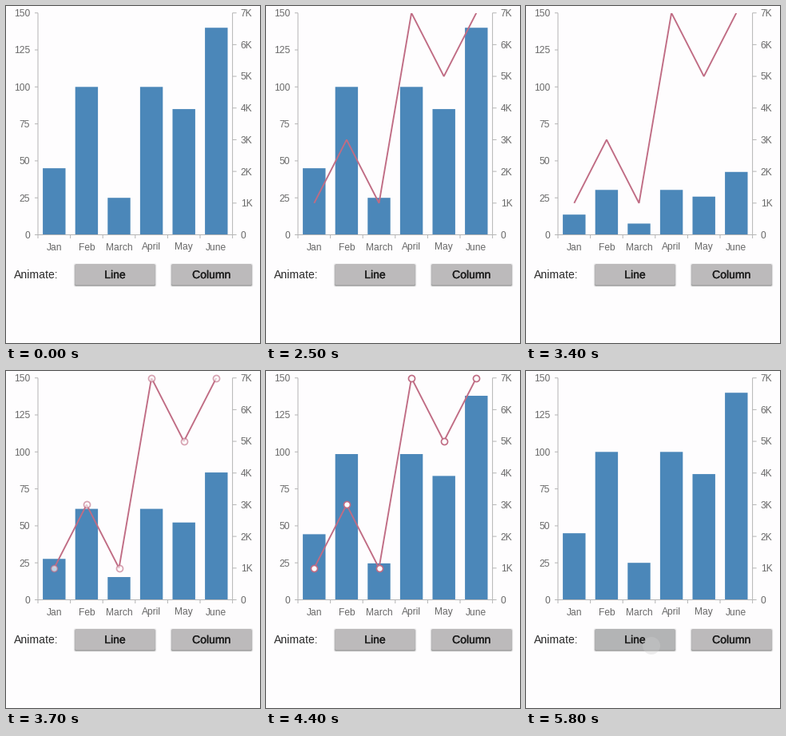
Write a matplotlib script that moves like this. It is 318 px wide and 422 px high and loops after 6 s.

```python
import numpy as np
import matplotlib.pyplot as plt
from matplotlib.animation import FuncAnimation
from matplotlib.patches import Circle, FancyBboxPatch, Rectangle
from matplotlib.patheffects import withStroke

W, H, DPI = 318, 422, 64
STEP, FRAMES = 100, 60
PT = 72 / DPI

LEFT, RIGHT, TOP, BASE = 40, 283.6, 8.7, 286.5
SLOT = (RIGHT - LEFT) / 6
BAR_W = 0.7 * SLOT
BLUE, ROSE = "#4b87b9", "#c06c84"
AXIS, LABEL, PAPER = "#b5b5b5", "#686868", "#fefdfe"
BUTTON, PRESSED = "#bcbabb", "#b3b4b5"

MONTHS = ["Jan", "Feb", "March", "April", "May", "June"]
COLUMNS = np.array([45, 100, 25, 100, 85, 140])
LINE = np.array([1, 3, 1, 7, 5, 7])

centers = LEFT + SLOT * (np.arange(6) + 0.5)
bar_heights = COLUMNS / 150 * (BASE - TOP)
line_y = BASE - LINE / 7 * (BASE - TOP)

fig = plt.figure(figsize=(W / DPI, H / DPI), dpi=DPI, facecolor=PAPER)
ax = fig.add_axes([0, 0, 1, 1])
ax.set_xlim(0, W)
ax.set_ylim(H, 0)
ax.axis("off")


def text(x, y, s, size=12, color=LABEL, ha="left", weight=0):
    t = ax.text(x, y, s, fontsize=size * PT, color=color, ha=ha,
                va="baseline", family="Liberation Sans", zorder=8)
    if weight:
        t.set_path_effects([withStroke(linewidth=weight * PT, foreground=color)])


def rule(x0, y0, x1, y1):
    ax.plot([x0, x1], [y0, y1], color=AXIS, lw=PT, snap=False,
            solid_capstyle="butt", zorder=3)


def button(x, label):
    def box(dy, grow, **style):
        patch = FancyBboxPatch((x - grow, 323 - grow + dy), 100.5 + 2 * grow, 26 + 2 * grow,
                               boxstyle="round,pad=0,rounding_size=1.8", lw=0, **style)
        return ax.add_patch(patch)

    for dy, grow, alpha in [(1, 1.6, 0.06), (1.2, 0.8, 0.12), (1.6, 0.2, 0.2)]:
        box(dy, grow, fc="black", alpha=alpha, zorder=5)
    text(x + 50.2, 341, label, 14, "#1c1c1c", "center", 0.35)
    return box(0, 0, fc=BUTTON, zorder=6)


# Axes and labels
rule(LEFT, TOP, LEFT, BASE)
rule(RIGHT, TOP, RIGHT, BASE)
rule(LEFT, BASE, RIGHT, BASE)
for i in range(7):
    y = BASE - i * (BASE - TOP) / 6
    rule(LEFT - 4, y, LEFT, y)
    text(30, y + 4.4, str(25 * i), ha="right")
    rule(LEFT + i * SLOT, BASE, LEFT + i * SLOT, BASE + 4.5)
for i in range(8):
    y = BASE - i * (BASE - TOP) / 7
    rule(RIGHT, y, RIGHT + 5, y)
    text(293.7, y + 4.4, f"{i}K" if i else "0")
for x, month in zip(centers, MONTHS):
    text(x, 305.5, month, ha="center")

text(10, 341, "Animate:", 14, "#2b2b2b")
line_button = button(86.3, "Line")
column_button = button(207.2, "Column")

# Series
bars = [ax.add_patch(Rectangle((x - BAR_W / 2, BASE), BAR_W, 0, fc=BLUE, lw=0,
                               snap=False, zorder=2)) for x in centers]
curve, = ax.plot(centers, line_y, color=ROSE, lw=1.9 * PT, zorder=4,
                 solid_joinstyle="miter", solid_capstyle="butt")
markers, = ax.plot(centers, line_y, "o", ms=8 * PT, mfc="white", mec=ROSE,
                   mew=1.7 * PT, zorder=5)
touch = ax.add_patch(Circle((0, 0), 11, fc="#cfcfcf", lw=0, zorder=9))


def decelerate(t, start, length):
    p = min(max((t - start) / length, 0), 1)
    return 1 - (1 - p) ** 2


def column_scale(t):
    return 1 if t < 3000 else decelerate(t, 3168, 1402)


def press_strength(t, start, release, fade):
    if t < start:
        return 0
    return min((t - start + STEP) / 200, 1) * min(max(1 - (t - release) / fade, 0), 1)


def update(frame):
    t = frame * STEP

    scale = column_scale(t)
    for bar, height in zip(bars, bar_heights):
        bar.set_y(BASE - height * scale)
        bar.set_height(height * scale)

    shown = t < 5800
    reveal = decelerate(t, 311, 2979) * (RIGHT - LEFT)
    curve.set_visible(shown and LEFT + reveal > centers[0])
    curve.set_clip_path(Rectangle((LEFT, TOP - 0.2), reveal, BASE - TOP,
                                  transform=ax.transData))
    markers.set_visible(shown and t >= 3500)
    markers.set_alpha(decelerate(t, 3450, 640))

    on_line = press_strength(t, 5600, 5900, 200)
    on_column = press_strength(t, 2800, 3000, 400)
    line_button.set_facecolor(PRESSED if on_line else BUTTON)
    column_button.set_facecolor(PRESSED if on_column else BUTTON)
    touch.center = (157, 344) if on_line else (272, 345.5)
    touch.set_alpha(0.35 * max(on_line, on_column))
    return [*bars, curve, markers, line_button, column_button, touch]


anim = FuncAnimation(fig, update, frames=FRAMES, interval=STEP,
                     repeat=True, repeat_delay=0, blit=False)
plt.show()
```
